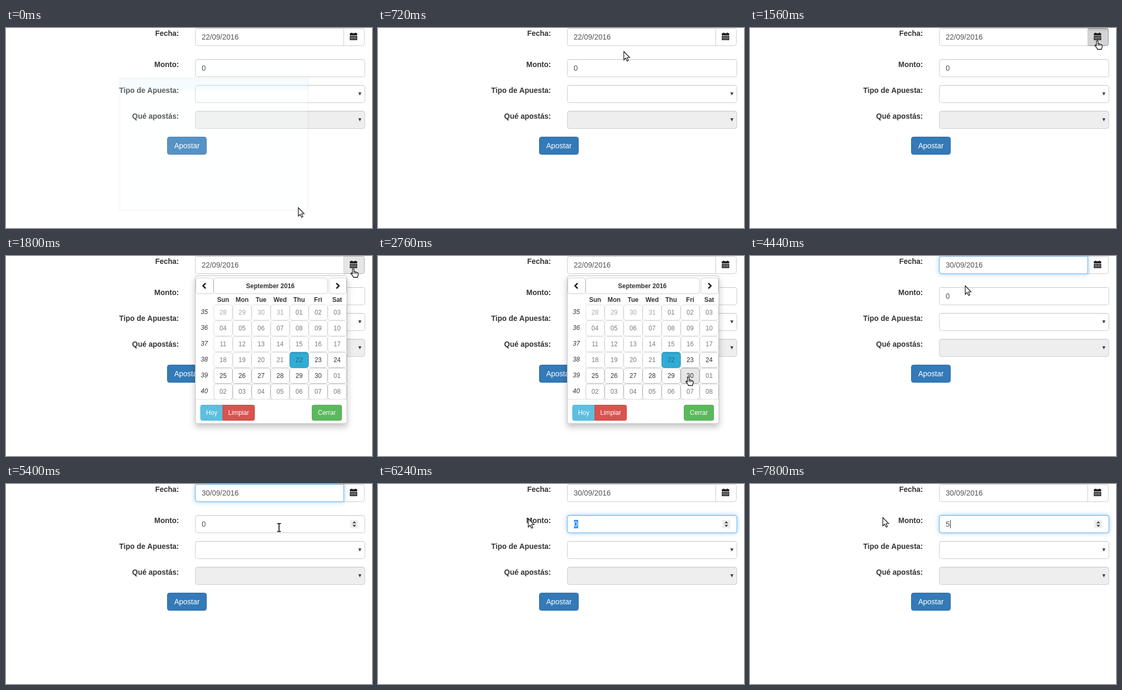
An HTML page with a canvas that plays this animation: 693 by 379 pixels, repeating every 8 s.

```html
<!DOCTYPE html>
<html lang="es">
<head>
<meta charset="utf-8">
<title>Formulario de apuesta</title>
<style>
html, body { margin: 0; width: 100%; height: 100%; overflow: hidden; background: #fff; }
canvas { display: block; }
</style>
</head>
<body>
<canvas id="stage" width="693" height="379"></canvas>
<script>
const ctx = document.getElementById('stage').getContext('2d');
const LOOP = 8000, STEP = 120;
const OPEN = 1800, PICK = 3600, FOCUS_AMOUNT = 5760, TYPED = 7800;
const DAYS = ['Sun', 'Mon', 'Tue', 'Wed', 'Thu', 'Fri', 'Sat'];

// Pointer stops: time, x, y
const PATH = [
  [0, 553, 340], [840, 460, 27], [1320, 657, 25], [2160, 657, 25], [2760, 587, 230],
  [3600, 586, 230], [4200, 450, 118], [4320, 425, 40], [4560, 389, 72], [4920, 500, 91],
  [5160, 521, 85], [5400, 517, 82], [5640, 517, 82], [5880, 385, 72], [6000, 317, 66],
  [6120, 317, 66], [6360, 251, 63], [8000, 251, 63]
];

const clamp = v => Math.max(0, Math.min(1, v));
const inside = (p, x, y, w, h) => p.x >= x && p.x < x + w && p.y >= y && p.y < y + h;

function pointerAt(t) {
  const i = PATH.findIndex((k, n) => n && t <= k[0]);
  const [t0, x0, y0] = PATH[i - 1], [t1, x1, y1] = PATH[i];
  const u = (t - t0) / (t1 - t0), e = u * u * (3 - 2 * u);
  return { x: Math.round(x0 + (x1 - x0) * e), y: Math.round(y0 + (y1 - y0) * e) };
}

function text(str, x, y, { size = 14, style = '', color = '#333', align = 'left' } = {}) {
  ctx.font = `${style} ${size}px "Liberation Sans", Arial, sans-serif`;
  ctx.textAlign = align;
  ctx.fillStyle = color;
  ctx.fillText(str, x, y);
}

function box(x, y, w, h, fill, border, radius = 4) {
  ctx.beginPath();
  ctx.roundRect(x + .5, y + .5, w - 1, h - 1, radius);
  ctx.fillStyle = fill;
  ctx.fill();
  ctx.strokeStyle = border;
  ctx.lineWidth = 1;
  ctx.stroke();
}

function shadowed(color, blur, dy, draw) {
  ctx.save();
  ctx.shadowColor = color;
  ctx.shadowBlur = blur;
  ctx.shadowOffsetY = dy;
  draw();
  ctx.restore();
}

function poly(points, fill, stroke, width = 1) {
  ctx.beginPath();
  points.forEach(([x, y]) => ctx.lineTo(x, y));
  if (fill) { ctx.closePath(); ctx.fillStyle = fill; ctx.fill(); }
  if (stroke) { ctx.strokeStyle = stroke; ctx.lineWidth = width; ctx.stroke(); }
}

function rect(x, y, w, h, color) {
  ctx.fillStyle = color;
  ctx.fillRect(x, y, w, h);
}

function field(x, y, w, { fill = '#fff', focus = 0, radius = 4 } = {}) {
  if (focus) shadowed(`rgba(102,175,233,${.6 * focus})`, 8, 0, () => box(x, y, w, 34, '#fff', '#fff', radius));
  box(x, y, w, 34, fill, '#ccc', radius);
  rect(x + 3, y + 1, w - 6, 1, 'rgba(0,0,0,.06)');
  if (focus) {
    ctx.globalAlpha = focus;
    box(x, y, w, 34, 'transparent', '#66afe9', radius);
    ctx.globalAlpha = 1;
  }
}

function select(y, fill) {
  field(358, y, 322, { fill });
  poly([[667, y + 14], [673, y + 14], [670, y + 20]], '#444');
}

function calendarIcon() {
  rect(653, 9, 3, 2, '#222');
  rect(660, 9, 3, 2, '#222');
  rect(651, 10, 14, 4, '#222');
  rect(651, 15, 14, 8, '#222');
  for (let i = 0; i < 4; i++) rect(653 + i * 3, 16, .8, 6, '#aaa');
  for (let i = 0; i < 2; i++) rect(652, 17.3 + i * 2.5, 12, .7, '#aaa');
}

function dateButton(t, p) {
  const hover = inside(p, 640, 0, 39, 34), pressed = t >= 1560 && t < OPEN;
  const [fill, border] = pressed ? ['#d4d4d4', '#8c8c8c'] : hover ? ['#e6e6e6', '#adadad'] : ['#fff', '#ccc'];
  box(639, 0, 40, 34, fill, border, [0, 4, 4, 0]);
  if (pressed) {
    const shade = ctx.createLinearGradient(0, 0, 0, 7);
    shade.addColorStop(0, 'rgba(0,0,0,.14)');
    shade.addColorStop(1, 'rgba(0,0,0,0)');
    rect(640, 1, 38, 6, shade);
  }
  calendarIcon();
}

function form(t, p) {
  const dateFocus = t < PICK ? 0 : t < FOCUS_AMOUNT ? clamp((t - PICK + 30) / 150) : clamp(1 - (t - FOCUS_AMOUNT + 30) / 150);
  const amountFocus = t < FOCUS_AMOUNT ? 0 : clamp((t - FOCUS_AMOUNT + 30) / 150);
  const label = (str, y) => text(str, 327.5, y, { style: 'bold', align: 'right' });
  label('Fecha:', 15);
  label('Monto:', 74);
  label('Tipo de Apuesta:', 123);
  label('Qué apostás:', 172);

  dateButton(t, p);
  field(358, 0, 282, { focus: dateFocus, radius: [4, 0, 0, 4] });
  text(t < PICK ? '22/09/2016' : '30/09/2016', 370.5, 22, { color: '#555' });
  const blinkOn = Math.floor(Math.max(0, t - 3700) / 500) % 2 === 0;
  if (t >= PICK && t < FOCUS_AMOUNT && blinkOn) rect(441, 9, 1, 16, '#333');

  field(358, 59, 322, { focus: amountFocus });
  const selected = t >= 6000 && t < TYPED;
  if (selected) rect(371, 68, 8, 16, '#3390ff');
  text(t < TYPED ? '0' : '5', 370.5, 81, { color: selected ? '#fff' : '#555' });
  if (t >= FOCUS_AMOUNT && !selected) rect(379, 68, 1, 16, '#333');
  const overAmount = inside(p, 358, 59, 322, 34) && (t < OPEN || t >= PICK);
  if (amountFocus || overAmount) {
    rect(652, 68, 15, 16, '#eee');
    poly([[656, 74.5], [663, 74.5], [659.5, 70.5]], '#444');
    poly([[656, 77.5], [663, 77.5], [659.5, 81.5]], '#444');
  }

  select(108, '#fff');
  select(157, '#eee');
  box(305, 206, 75, 34, '#337ab7', '#2e6da4');
  text('Apostar', 342.5, 228, { color: '#fff', align: 'center' });
}

function day(index, p) {
  const x = 393 + index % 7 * 36, y = 92 + Math.floor(index / 7) * 30;
  const n = index - 3, current = n >= 1 && n <= 30, past = n < 22;
  const label = String(n < 1 ? n + 31 : n > 30 ? n - 30 : n).padStart(2, '0');
  const hover = !past && n !== 22 && inside(p, x, y, 36, 30);
  let fill = '#fff', border = past ? '#ddd' : '#ccc';
  let color = n < 1 ? '#a8a8a8' : past ? '#7c7c7c' : current ? '#333' : '#777';
  if (hover) [fill, border] = ['#e6e6e6', '#adadad'];
  if (n === 22) [fill, border, color] = ['#31acd4', '#269abc', '#1c6f8d'];
  box(x, y, 36, 30, fill, border);
  if (n === 22) rect(x + 2, y + 1, 32, 2, 'rgba(0,0,0,.08)');
  text(label, x + 18, y + 19, { size: 12, color, align: 'center' });
}

function chevron(x, dir) {
  poly([[x - dir * 2.5, 51.5], [x + dir * 2.5, 56.5], [x - dir * 2.5, 61.5]], null, '#222', 2.6);
}

function calendar(p) {
  shadowed('rgba(0,0,0,.22)', 12, 6, () => box(358, 37, 288, 281, '#fff', '#ccc'));
  box(358, 37, 288, 281, '#fff', '#c4c4c4');
  for (const x of [359, 611]) {
    const hover = inside(p, x, 41, 34, 31);
    box(x, 41, 34, 31, hover ? '#e6e6e6' : '#fff', hover ? '#adadad' : '#ccc');
  }
  box(393, 41, 216, 31, '#fff', '#ccc');
  chevron(375.5, -1);
  chevron(628, 1);
  const small = { size: 12, align: 'center' };
  text('September 2016', 500.5, 61, { ...small, style: 'bold' });
  DAYS.forEach((name, i) => text(name, 411 + i * 36, 87, { ...small, style: 'bold' }));
  for (let w = 0; w < 6; w++) text(35 + w, 375.5, 110 + w * 30, { ...small, style: 'italic' });
  for (let i = 0; i < 42; i++) day(i, p);
  rect(359, 271, 286, 1, '#ddd');

  const button = (str, x, w, fill, border, radius) => {
    box(x, 282, w, 30, fill, border, radius);
    text(str, x + w / 2, 301, { ...small, color: '#fff' });
  };
  button('Hoy', 368, 43, '#5bc0de', '#46b8da', [3, 0, 0, 3]);
  button('Limpiar', 410, 61, '#d9534f', '#d43f3a', [0, 3, 3, 0]);
  button('Cerrar', 579, 57, '#5cb85c', '#4cae4c', 3);
}

function fadingDialog() {
  rect(215, 95, 357, 250, 'rgba(250,252,252,.18)');
  rect(215, 95, 357, 23, 'rgba(190,228,235,.12)');
  ctx.strokeStyle = 'rgba(0,0,0,.018)';
  ctx.lineWidth = 4;
  ctx.strokeRect(215, 95, 357, 250);
}

const CURSORS = {
  arrow() {
    poly([[.5, .5], [.5, 16.5], [4, 13], [6.7, 18.7], [9.2, 17.6], [6.7, 12], [11.6, 12]], '#fff', '#111', 1.2);
  },
  hand() {
    ctx.translate(-5, -2);
    poly([[4, 2], [5.5, 1], [7, 2], [7, 7], [9.5, 7], [12, 8], [14.5, 9], [15, 12], [13.5, 17.5],
      [6, 17.5], [4.5, 14.5], [1, 10.5], [2, 9], [4, 10.5]], '#fff', '#111', 1.3);
    for (const x of [7, 9.5, 12]) poly([[x, 8], [x, 11]], null, '#111');
  },
  beam() {
    for (const [color, width] of [['#fff', 3.5], ['#111', 1.7]]) {
      poly([[0, -7], [0, 8]], null, color, width);
      for (const y of [-7, 8]) poly([[-3.5, y], [3.5, y]], null, color, width);
    }
  }
};

function cursorKind(t, p, open) {
  if (t >= FOCUS_AMOUNT && t < 6240) return 'beam';
  if (inside(p, 640, 0, 39, 34)) return 'hand';
  if (open) return inside(p, 537, 182, 108, 90) || inside(p, 611, 41, 34, 31) ? 'hand' : 'arrow';
  if (inside(p, 305, 206, 75, 34)) return 'hand';
  return inside(p, 358, 0, 282, 34) || inside(p, 358, 59, 294, 34) ? 'beam' : 'arrow';
}

function draw(now) {
  const t = Math.floor(now % LOOP / STEP) * STEP;
  const p = pointerAt(t), open = t >= OPEN && t < PICK;
  rect(0, 0, 693, 379, '#fff');
  form(t, p);
  if (open) calendar(p);
  if (t < STEP) fadingDialog();
  ctx.save();
  ctx.translate(p.x, p.y);
  CURSORS[cursorKind(t, p, open)]();
  ctx.restore();
}

let start;
function tick(now) {
  start ??= now;
  draw(now - start);
  requestAnimationFrame(tick);
}
requestAnimationFrame(tick);
</script>
</body>
</html>
```
